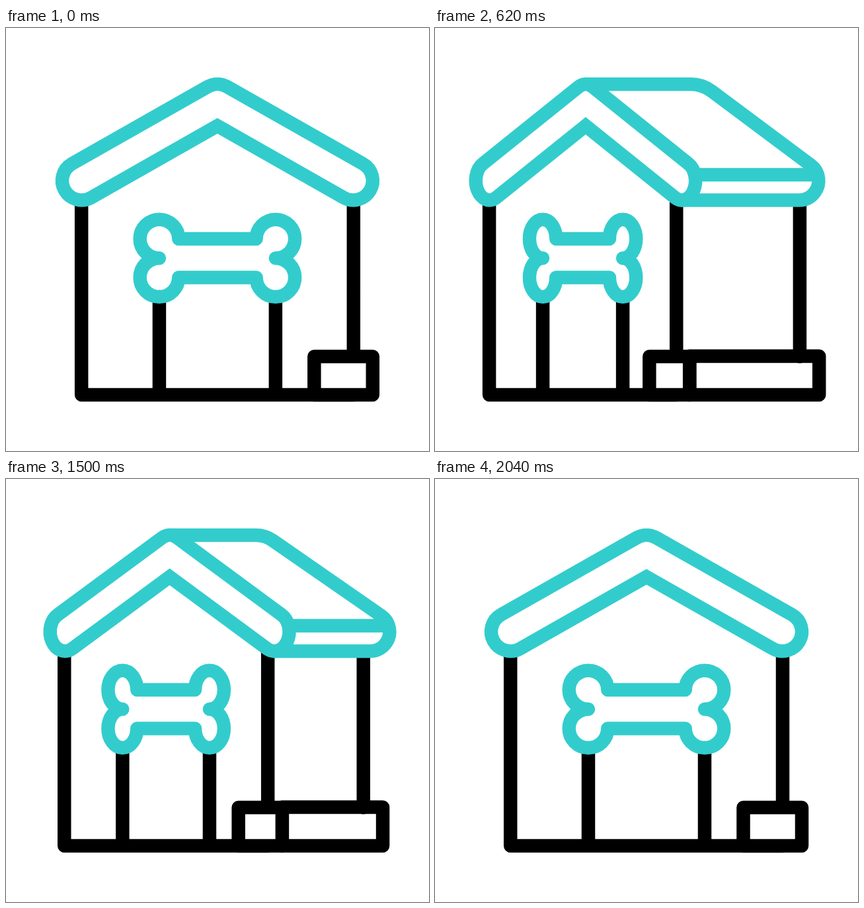
Animation, 640 px wide and 640 px high, one loop 2400 ms. Source, as an HTML page with a canvas:

```html
<!DOCTYPE html>
<html>
<head>
<meta charset="utf-8">
<style>
html, body { margin: 0; width: 100%; height: 100%; overflow: hidden; background: #fff; }
canvas { display: block; }
</style>
</head>
<body>
<canvas id="stage" width="640" height="640"></canvas>
<script>
const ctx = document.getElementById('stage').getContext('2d');
const LOOP = 2400, OPEN = 570, CLOSE = 1590, END = 2040;
const TEAL = '#33cccc', BLACK = '#000', R = 29.4;
const PI = Math.PI, TILT = 0.517;

const clamp = x => Math.min(1, Math.max(0, x));
const drift = t => clamp((t - OPEN) / (CLOSE - OPEN)) ** 1.6;

// How far the front has turned: swing out, drift back by drop, swing home
function turn(t, drop) {
  const swing = 1.003 * clamp(t / OPEN) ** 1.07;
  return (swing - drop * drift(t)) * clamp((END - t) / (END - CLOSE));
}

// Right side of the back: slides out at speed, drifts, slides in again
function slide(t, peak, drop, speed) {
  return peak - drop * drift(t) - speed * Math.max(0, OPEN - t) - .14 * Math.max(0, t - CLOSE);
}

// Builds a path squeezed around x = 320, then strokes it at constant width
function shape(color, build, scale = 1, mid = 320, fill = false) {
  ctx.beginPath();
  ctx.setTransform(scale, 0, 0, 1, mid - 320 * scale, 0);
  build();
  ctx.resetTransform();
  if (fill) {
    ctx.fillStyle = '#fff';
    ctx.fill();
  }
  ctx.strokeStyle = color;
  ctx.stroke();
}

function line(x1, y1, x2, y2) {
  ctx.moveTo(x1, y1);
  ctx.lineTo(x2, y2);
}

function frontWalls() {
  ctx.moveTo(114.2, 262);
  ctx.lineTo(114.2, 555);
  ctx.lineTo(526, 555);
  line(526, 262, 526, 497);
  line(232, 407, 232, 555);
  line(408, 407, 408, 555);
}

function bone() {
  ctx.arc(232, 319, 29.3, 0, PI / 2, true);
  ctx.arc(232, 377.5, 29.3, -PI / 2, 0, true);
  ctx.arc(408, 377.5, 29.3, PI, -PI / 2, true);
  ctx.arc(408, 319, 29.3, PI / 2, PI, true);
  ctx.closePath();
}

function frontRoof() {
  const up = -PI / 2;
  ctx.moveTo(320, 148);
  ctx.arc(114.4, 231, R, PI / 2 - TILT, up - TILT);
  ctx.arc(320, 114.3, R, up - TILT, up + TILT);
  ctx.arc(525.6, 231, R, up + TILT, PI / 2 + TILT);
  ctx.closePath();
}

function backRoof(right, apex, scale) {
  const cx = right - 39.7;
  const start = right - 105 - 140 * scale;
  const bend = 8 + 114 * (1 - scale) ** 2;
  const corner = start + bend;
  const dx = cx - corner, dy = 146;
  // Tangent from the top corner to the round right end
  const slope = Math.atan2(dy, dx) - Math.asin(R / Math.hypot(dx, dy));
  const frontCap = apex + 205.6 * scale;
  shape(TEAL, () => {
    ctx.moveTo(Math.min(apex, start), 85);
    ctx.arcTo(corner, 85, corner + 100 * Math.cos(slope), 85 + 100 * Math.sin(slope),
      bend / Math.tan(slope / 2));
    ctx.arc(cx, 231, R, slope - PI / 2, PI / 2);
    ctx.lineTo(frontCap, 260.4);
    line(frontCap, 222, cx + 28, 222);
  });
}

function draw(t) {
  const roof = turn(t, .25), wall = turn(t, .225);
  const roofScale = 1 - .2926 * roof, apex = 320 - 92 * roof;
  const wallScale = 1 - .312 * wall, mid = 320 - 96.3 * wall;
  const wallX = mid + 206 * wallScale, boxX = mid + 235 * wallScale;
  const backX = slide(t, 552, 13, .134);
  const backRight = slide(t, 590.7, 0, .156);

  ctx.clearRect(0, 0, 640, 640);
  ctx.lineWidth = 20.5;
  ctx.lineJoin = ctx.lineCap = 'round';

  if (backX > wallX) {
    shape(BLACK, () => {
      line(backX, 262, backX, 497);
      ctx.rect(boxX, 496.6, backX + 29.3 - boxX, 58.4);
    });
  }
  shape(BLACK, frontWalls, wallScale, mid);
  shape(BLACK, () => ctx.rect(466.5, 497, 88.5, 58), wallScale, mid, true);
  shape(TEAL, bone, wallScale, mid);

  if (backRight > apex + 235 * roofScale + 10.5) backRoof(backRight, apex, roofScale);
  ctx.lineJoin = 'miter';
  shape(TEAL, frontRoof, roofScale, apex, true);
}

const begin = performance.now();
function tick() {
  draw((performance.now() - begin) % LOOP);
  requestAnimationFrame(tick);
}
tick();
</script>
</body>
</html>
```
